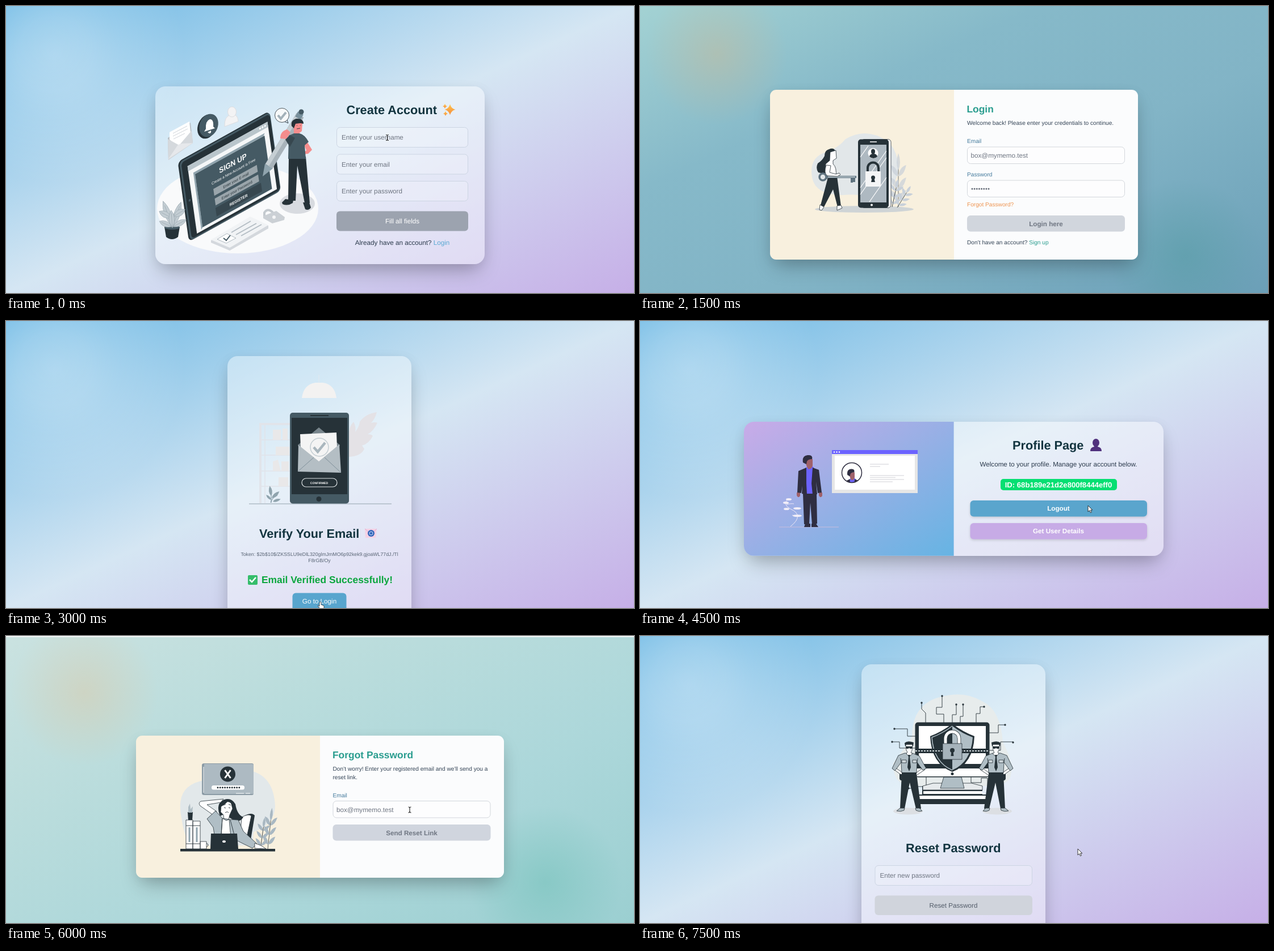
Write an HTML page that moves like this. It is 1106x507 px and loops after 9 s.

```html
<!DOCTYPE html>
<html lang="en">
<head>
<meta charset="utf-8">
<title>Account screens</title>
<style>
html, body { margin: 0; width: 100%; height: 100%; overflow: hidden }
section { position: absolute; left: 0; top: 0; width: 1106px; height: 507px; overflow: hidden; visibility: hidden }
section > svg { position: absolute; left: 0; top: 0; width: 1106px; height: 507px }
.sky { background: radial-gradient(circle at 85px 85px, #ffffff58, #ffffff46 65px, #ffffff2c 115px, #fff0 230px), linear-gradient(to bottom right, #6cb8e4, #d5e6f3 50%, #c6afe7) }
.teal { background: radial-gradient(circle at 135px 85px, #d4b58a60, #d4b58a00 125px), radial-gradient(circle at 960px 440px, #4f9a9f70, #4f9a9f00 135px), linear-gradient(to bottom right, #a3d2d3, #86b9c9 32%, #82b4c6 60%, #6b9fb7) }
.mint { background: linear-gradient(#f4f8f8 1.5px, #fff0 2px), radial-gradient(circle at 138px 100px, #dfc49c66, #dfc49c00 130px), radial-gradient(circle at 950px 435px, #68bdb370, #68bdb300 135px), linear-gradient(to bottom right, #cae2e0, #b9dcdc 35%, #acd7da 65%, #9bcfd1) }
.card { position: absolute; border-radius: 18px; background: #ffffff66; overflow: hidden; box-shadow: 0 18px 36px -9px #00000048, 0 4px 22px #0000000d }
.split { border-radius: 11px; background: linear-gradient(90deg, #f8f0de 50%, #fbfcfd 50%) }
text { font-family: "Liberation Sans", Arial, sans-serif; font-size: 11.67px; fill: #6f7682; white-space: pre; text-rendering: geometricPrecision }
.h { font-size: 21.7px; font-weight: bold; fill: #12343f }
.h2 { font-size: 17.4px; font-weight: bold; fill: #2a9d8f }
.s { font-size: 10.15px; fill: #344456 }
.tiny { font-size: 6.6px }
.token { font-size: 8.75px; fill: #586474 }
.lab { fill: #457b9d }
.c { text-anchor: middle }
.b { font-weight: bold }
.ink { fill: #2b3a4c }
.d { fill: #263238 } .m { fill: #455a64 } .g { fill: #b0bec5 } .w { fill: #fff } .p { fill: #e6eaec }
.skin { fill: #f58d8d }
.l { fill: none; stroke: #263238; stroke-width: .9 }
.o { stroke: #263238; stroke-width: .8 }
.field { fill: #ffffff2e; stroke: #ccd5e3 }
.plain { fill: #fdfdfe; stroke: #d3d7dc }
</style>
</head>
<body>
<svg width="0" height="0" style="position:absolute">
  <defs>
    <linearGradient id="spark" x2="0" y2="1"><stop stop-color="#ffc64d"/><stop offset="1" stop-color="#f58a3c"/></linearGradient>
    <path id="arrow" d="M0 0v11l2.6-2.4 1.9 4 1.9-.9-1.9-3.8h3.4z" fill="#fff" stroke="#222" stroke-width=".9"/>
    <path id="beam" d="M-2.5-5q2.5 0 2.5 2v6q0 2-2.5 2M2.5-5q-2.5 0-2.5 2v6q0 2 2.5 2" fill="none" stroke="#333" stroke-width="1.2"/>
    <path id="star" d="M0-1Q.2-.2 1 0Q.2.2 0 1Q-.2.2-1 0Q-.2-.2 0-1" fill="url(#spark)"/>
    <path id="leaf" d="M0 0Q-6-8 0-18Q6-8 0 0"/>
    <path id="wide" d="M0 0Q-11-13 0-24Q11-13 0 0M0 0V-20"/>
    <g id="sprig">
      <path d="M0 0V-44" class="l"/>
      <use href="#leaf" y="-38"/>
      <g id="pair"><use href="#leaf" transform="translate(0 -6) rotate(50)"/><use href="#leaf" transform="translate(0 -6) rotate(-50)"/></g>
      <use href="#pair" y="-13"/><use href="#pair" y="-26"/>
    </g>
    <g id="guard">
      <ellipse cx="472" cy="309.500" rx="26" ry="6" fill="#dcdfe3"/>
      <path class="d" d="M461 243h26l8 62h-9l-11-46-9 46h-8z"/>
      <path class="g o" d="M466 304l-1 4q-6 3-13 1l6-5zM485 304l1 4q5 3 11 1l-5-5z"/>
      <path class="w o" d="M446 235l4-2 12 8-1 5zM502 236l-4-3-12 9 1 4z"/>
      <path class="g o" d="M466 207l-11 4-11 23 5 4 11-15 1 19h26l1-19 10 14 6-3-12-22-12-5z"/>
      <path class="l" d="M460 224l-1-8M488 224l1-8"/>
      <path fill="#cfd8dc" class="o" d="M461 219h8v5h-8zM480 219h7v5h-7z"/>
      <path class="w o" d="M468 191h12l-1 11-2 4 3 2-6 5-5-5 2-3-2-3z"/>
      <path class="d" d="M472 210h4l-1 4 2 18-3 7-3-7 2-18zM461 241h26v3h-26zM457 244h6v11q-5 1-6-3zM467 195l-1-6q5-5 16-1l-1 7-2-3h-10zM468 195h12l-1 4h-4l-1-2-1 2h-4z"/>
    </g>
  </defs>
</svg>

<section class="sky">
  <div class="card" style="left:263px;top:141.500px;width:580px;height:314px"></div>
  <svg>
    <ellipse cx="408" cy="358" rx="142" ry="79" fill="#f9fafb"/>
    <ellipse cx="513" cy="349" rx="31" ry="18" fill="#d8dbe0"/>
    <!-- tablet -->
    <g transform="matrix(.88 -.49 .14 1 333 297)" class="c b">
      <rect x="-29" y="-36" width="183" height="141" rx="8" class="d"/>
      <rect x="-26" y="-34" width="181" height="139" rx="7" class="m"/>
      <rect x="-23" y="-31" width="177" height="134" rx="6" class="d"/>
      <rect x="-12" y="-20" width="160" height="119" fill="#f5f7f8"/>
      <rect x="-12" y="-20" width="160" height="9" fill="#b9c5cb"/>
      <path stroke="#fff" stroke-width="3" stroke-dasharray="3 2" d="M131-15.500h14"/>
      <path fill="#90a4ae" d="M-3-4h143l-3 4H0v94l-3 3z"/>
      <rect width="139" height="94" class="m"/>
      <text x="73" y="21" class="w" style="font-size:13.300px">SIGN UP</text>
      <text x="72" y="33" class="w tiny" font-weight="400">Create a New Account is Free</text>
      <path fill="#9aa5ab" d="M30 41h87v12h-87zM30 58h87v12h-87z"/>
      <text x="74" y="49.500" class="d tiny" font-weight="400">Enter your E-mail</text>
      <text x="73.500" y="66.500" class="d tiny" font-weight="400">Enter your Password</text>
      <path fill="#37474f" d="M29 74h91v15h-91z"/>
      <text x="74" y="84.500" class="w" style="font-size:7px">REGISTER</text>
      <circle cx="-17" cy="38" r="2" class="m"/>
    </g>
    <!-- floating icons -->
    <path fill="#b9c0c6" d="M285 233l40-27 4 36-43 30z"/>
    <path class="w" d="M288 223l35-19 3 29-22 17-16-14z"/>
    <path stroke="#cfd4d9" d="M294 225l25-13M294 230l26-13M295 235l20-10"/>
    <path fill="#d5d9dd" d="M285 235l20 11 22-26 2 22-43 30z"/>
    <path fill="#e6e8eb" d="M286 270l17-25 7-2 19-1z"/>
    <ellipse cx="354" cy="213" rx="16" ry="22" class="d" transform="rotate(22 354 213)"/>
    <ellipse cx="357" cy="211" rx="16" ry="21" class="m" transform="rotate(22 357 211)"/>
    <path class="w" d="M349 222l3-5q-1-14 7-17 7 0 6 13l3 3zM355 223l6-3q1 5-3 5z"/>
    <g fill="#f3f3f4" stroke="#dcdde0"><path d="M385 213q-1-18 11-21 12-3 13 12z"/><ellipse cx="398" cy="187" rx="7.500" ry="9"/></g>
    <path class="l w" d="M490 204l7 3-2-6"/>
    <circle cx="486" cy="193" r="12.500" fill="#f7f9fa" class="o"/>
    <path d="M479 193l5 6 9-11" fill="none" stroke="#a3b1b9" stroke-width="4"/>
    <!-- pen and writer -->
    <path d="M463 283l55-90" stroke="#a8b3ba" stroke-width="15"/>
    <path d="M460 281l55-90" stroke="#c5ced3" stroke-width="7"/>
    <path fill="#90a4ae" d="M456 279l14 8-18 14z"/>
    <path d="M514 198l5-9" stroke="#78909c" stroke-width="11"/><circle cx="520" cy="187" r="4.500" class="m"/>
    <path class="skin" d="M483 234q0-13 12-16l6 5-7 12zM506 207h16l-1 14-5 4v5h-9v-8zM531 241l8 13-7 7-11 1 8-7-4-10z"/>
    <path class="d" d="M503 212q-2-11 9-13 12 0 12 9l-6-1-8 1-3 8zM498 266h30l7 82h-9l-13-66-3 62h-13z"/>
    <path class="m" d="M498 229l9-4h10q9 2 16 15l-7 6 2 24h-31z"/>
    <path fill="#37474f" d="M492 236l8-8 9 5-9 16z"/>
    <path class="d" d="M492 341l14 2-1 5q-9 6-18 2l-1-3zM523 347h11l3 9q-4 6-10 3z"/>
    <path class="l" d="M512 211h1M518 211h1M512 217l6-1"/>
    <!-- plant, form and padlock -->
    <path class="d" d="M279 390h27l-3 18q-11 8-21 0z"/><ellipse cx="292.500" cy="391" rx="13.500" ry="4" class="m"/>
    <g fill="#c3cdd3" stroke="#8d9ca5" stroke-width=".5">
      <use href="#wide" transform="translate(293 390) rotate(-20) scale(1 2)"/><use href="#wide" transform="translate(294 390) rotate(18) scale(1 1.900)"/>
      <use href="#wide" transform="translate(291 374) rotate(-62)"/><use href="#wide" transform="translate(295 372) rotate(58)"/>
      <use href="#wide" transform="translate(292 390) rotate(-66) scale(.9 1)"/><use href="#wide" transform="translate(294 390) rotate(62) scale(.9 1.100)"/>
      <use href="#wide" transform="translate(293 392) rotate(-4) scale(.9 1.300)"/>
    </g>
    <path fill="#d4d8dd" d="M361 414l69-41 32 15v5l-68 39-33-14z"/><path fill="#f1f3f5" d="M361 413l69-41 32 15-68 40z"/>
    <path class="w" stroke="#b0b9c0" d="M372 412l17-10 16 8-17 9z"/>
    <path d="M383 410l5 4 7-9" fill="none" stroke="#455a64" stroke-width="2"/>
    <path stroke="#b4bdc4" stroke-width="2" d="M397 400l34-20M405 404l36-20M414 406l36-20"/>
    <path d="M455 372v-7q6-9 15 0v9" fill="none" stroke="#c4cacf" stroke-width="4"/><path fill="#cbd0d5" d="M453 371l23-9 15 11-1 5-21 6-16-9z"/><circle cx="472" cy="373" r="3" fill="#f4f5f6"/>
    <!-- form -->
    <text class="h" x="599.500" y="191">Create Account</text>
    <use href="#star" transform="translate(782 183) scale(9.500)"/><use href="#star" transform="translate(773 177) scale(4)"/><use href="#star" transform="translate(774 190) scale(4)"/>
    <g class="field"><rect id="f" x="582.500" y="214.500" width="231" height="35" rx="6"/><use href="#f" y="47.500"/><use href="#f" y="95"/></g>
    <text x="591" y="236">Enter your username</text><text x="591" y="283.500">Enter your email</text><text x="591" y="331">Enter your password</text>
    <rect x="582" y="362.500" width="232" height="35" rx="6" fill="#9ca3af"/>
    <text class="c w" x="698" y="384">Fill all fields</text>
    <text class="c ink" x="698" y="422">Already have an account? <tspan fill="#5aa9d3">Login</tspan></text>
    <use href="#beam" x="671.500" y="232.500"/>
  </svg>
</section>

<section class="teal">
  <div class="card split" style="left:229px;top:147.500px;width:648px;height:300.500px"></div>
  <svg>
    <path fill="#e2e7e9" d="M303 303q-6-36 25-45 21-7 34-23 37-22 74 4 20 18 19 54-12 46-53 43-21-4-45-2-48 0-54-31z"/>
    <ellipse cx="395" cy="359" rx="87" ry="6" fill="#cfd4d6"/>
    <g fill="#c8d0d9"><use href="#sprig" transform="translate(455 355) scale(1 1.700)" opacity=".7"/><use href="#sprig" transform="translate(444 355) rotate(12) scale(.9)"/><use href="#sprig" transform="translate(453 356) rotate(32) scale(.8)"/></g>
    <rect x="390" y="235.500" width="52" height="121" rx="5" class="w o"/>
    <rect x="384" y="235.500" width="54" height="121" rx="5" class="d"/>
    <path fill="#aeb9c1" d="M388 245h46v102h-46z"/>
    <path stroke="#fff" d="M388 321l46-65M388 333l46-65M404 346l30-43M388 267l14-20" stroke-width="1.200"/>
    <path stroke="#fff" d="M405 240h12M440 245v18" stroke-width="1.500"/>
    <circle cx="408" cy="351.500" r="2" class="w"/>
    <circle cx="410.500" cy="260" r="9" class="w"/><path class="d" d="M404 266q1-5 7-5t7 5q-7 6-14 0z"/><ellipse cx="410.500" cy="257" rx="3.500" ry="4.500" class="d"/>
    <path d="M401 294v-8a9.500 9.500 0 0 1 19 0v8" fill="none" stroke="#263238" stroke-width="4"/>
    <rect x="397" y="292" width="27" height="27" fill="#f4f5f6"/><circle cx="410.500" cy="303" r="3.500" class="d"/><path class="d" d="M409 303h3l2 8h-7z"/>
    <path class="d" d="M345 258q-3-9-12-5-8 2-8 12-4 8-12 13-4 9 1 16 14 4 20-2 6-7 4-18z"/>
    <path class="w o" d="M335 258l10-3 1 14-6 4v6q7 6 5 23l-15 4-4-9 1-18 7-6z"/>
    <path class="d" d="M331 303l16-2 7 53-6 1-8-31-16 31-6-3z"/>
    <path class="w o" d="M317 351l7 4-4 6-4-1zM347 353l7-1 2 5-9 4z"/>
    <g fill="none" stroke="#607480"><circle cx="322" cy="302" r="6" stroke-width="3.500"/><path d="M329 302h52M373 303v9M377 303v8" stroke-width="4"/></g>
    <path d="M331 302h48" stroke="#b0bec5" stroke-width="2"/>
    <path class="w o" d="M328 281q-5 14 2 19l18 1 5-3-2-3-6 2-11-3 2-12z"/>
    <text class="h2" x="575.500" y="188">Login</text>
    <text class="s" x="576" y="210">Welcome back! Please enter your credentials to continue.</text>
    <text class="s lab" x="576" y="242">Email</text><text class="s lab" x="576" y="301">Password</text>
    <g class="plain"><rect x="576.500" y="249" width="277" height="29.500" rx="6"/><rect x="576.500" y="308" width="277" height="29.500" rx="6"/></g>
    <text x="582.500" y="268">box@mymemo.test</text>
    <path d="M585 323h31" stroke="#666d78" stroke-width="3" stroke-linecap="round" stroke-dasharray="0 4.150"/>
    <text class="s" x="576" y="354" style="fill:#ee9450">Forgot Password?</text>
    <rect x="576" y="370" width="278" height="28.500" rx="6" fill="#d1d6dd"/>
    <text class="c b" x="715" y="388.500">Login here</text>
    <text class="s" x="576" y="420.500">Don’t have an account? <tspan fill="#2a9d8f">Sign up</tspan></text>
  </svg>
</section>

<section class="sky">
  <div class="card" style="left:390px;top:62px;width:324px;height:500px"></div>
  <svg>
    <path fill="#f3f2f1" d="M521 136q3-24 24-27h13q21 3 24 27z"/>
    <path stroke="#e3e8ee" d="M551 95v14"/>
    <g fill="none" stroke="#e1e4ea"><path stroke-width="4" d="M448 322v-140h52"/><path stroke-width="1.500" d="M456 322v-140M450 210h50M450 237h50M450 265h50M450 292h50"/></g>
    <path fill="#e9e8e9" d="M470 192h14v18h-14zM487 190h9v20h-9zM475 222h24v15h-24zM470 248l9-3 5 20h-14zM485 248h13v17h-13zM480 276h17v16h-17z"/>
    <path fill="#e4e2e6" d="M604 240v-38q-1-14 8-24 5 9 3 18 7-9 8-18 10-14 30-17-3 12-10 19 7-2 11 0-8 16-17 20 7 0 9 3-7 14-19 17l4 6q-6 13-27 14z"/>
    <path d="M428 323h251" stroke="#93a3ad"/>
    <g fill="#90a4ae"><path d="M467 321q0-15 0-20M466 321q4-11 12-13" stroke="#78909c" fill="none"/><use href="#leaf" transform="translate(467 309) rotate(-8)"/><use href="#leaf" transform="translate(468 313) rotate(48)"/><use href="#leaf" transform="translate(467 316) rotate(-45) scale(.7)"/><use href="#leaf" transform="translate(470 319) rotate(72) scale(.8)"/></g>
    <rect x="500" y="162" width="104" height="160.500" rx="5" class="m"/>
    <path class="d" d="M503 171h98v135h-98zM536 166h32v2h-32z"/><circle cx="551" cy="314.500" r="4.500" class="d"/>
    <path fill="#78858c" d="M514 219l37-31 37 31-1 3h-72z"/><path fill="#f4f4f4" d="M518 200l64-3 2 52h-64z"/>
    <path fill="#b4bec4" d="M515 219l36 29 36-30 3 50-76-2z"/>
    <path d="M515 265l27-24M589 267l-28-26" stroke="#7e8f99"/>
    <circle cx="552" cy="223" r="16" fill="none" stroke="#c3cdd2" stroke-width="1.500"/><path d="M542 223l7 8 13-16" fill="none" stroke="#aab7be" stroke-width="4.500"/>
    <rect x="521" y="278" width="62" height="15" rx="7.500" fill="none" stroke="#dfe4e6" stroke-width="1.200"/>
    <text class="c b w" x="551.500" y="287.500" style="font-size:5.200px">CONFIRMED</text>
    <text class="h" x="446" y="382.500">Verify Your Email</text>
    <path fill="#f4d1e4" d="M632 367h21l-2 16h-18z"/><path d="M632 367l11 10 10-10" fill="none" stroke="#dca9d2"/><circle cx="643" cy="375" r="6" fill="#3467ba"/><circle cx="643" cy="375" r="3" fill="none" stroke="#cfe1ff"/>
    <text class="c token" x="552" y="415">Token: $2b$10$/ZKSSLU9eDlL320glmJmMO6p92kek9.gjoaWL77dJ./Tl</text><text class="c token" x="552" y="426">F8rGB/Oy</text>
    <rect x="426" y="449" width="17" height="17" rx="2" fill="#35bd6b"/><path d="M429 457l4 4 7-8" fill="none" stroke="#fff" stroke-width="2.500"/>
    <text class="h2" x="450" y="463" style="fill:#0ba63e">Email Verified Successfully!</text>
    <rect x="504.500" y="480.500" width="95" height="34" rx="6" fill="#58a5ce"/>
    <text class="c w" x="552" y="499">Go to Login</text>
    <path class="w o" d="M552 504v-7q2-2 3 0v4l5 2v5h-7l-4-5q1-2 3 1z"/>
  </svg>
</section>

<section class="sky">
  <div class="card" style="left:183px;top:178px;width:739px;height:236.500px;background:linear-gradient(to bottom right,#c9abe8,#66b4e3) 0/369.500px 100% no-repeat,linear-gradient(90deg,#fff0 369.500px,#ffffff70 0)"></div>
  <svg>
    <path d="M245 364h105" stroke="#c8bddd"/>
    <path d="M265 363q25-20 0-31-15-8-4-18M258 324q9-2 13-1M268 343q11 3 15 1" fill="none" stroke="#eee8f6"/>
    <g fill="#f2eef8"><ellipse cx="262" cy="315" rx="5" ry="2"/><ellipse cx="257" cy="321" rx="5" ry="2"/><ellipse cx="277" cy="331" rx="7" ry="2"/><ellipse cx="258" cy="332" rx="5" ry="2"/><ellipse cx="277" cy="344" rx="8" ry="2"/></g>
    <path fill="#a0616a" d="M276 303h6v6q-4 5-6-1zM315 303h6v6q-4 5-6-1z"/>
    <g id="bust"><path fill="#6c63ff" d="M291 260l5-3h8l3 3v45h-15z"/><path fill="#a0616a" d="M290 244h14v12l-2 4-5 2-3-4z"/><path fill="#2f2e41" d="M287 250q-2-12 8-13 10-1 8 7-7 0-9 4l-1 5zM293 259l-14 6-2 38 7 1 2-13-1 14 9 2-1-20zM304 259l11 4 5 40-7 1-3-20 2 22-8 1-2-20z"/></g>
    <path fill="#2f2e41" d="M287 305h24l1 53-9 1-3-38-2 38h-9zM291 358h9v6h-11zM302 358h8l4 6h-12z"/>
    <path fill="#e6e6e6" d="M338 228h151v76h-151z"/><path class="w" d="M343 238h141v60h-141z"/><path fill="#6c63ff" d="M338 228h151v7h-151z"/>
    <path d="M342 231.500h11" stroke="#fff" stroke-width="2.500" stroke-linecap="round" stroke-dasharray="0 4.500"/>
    <path d="M405 253h33M405 257h18M405 273h60M405 276.500h45M405 280h60M405 284h40" stroke="#e0e0e3" stroke-width="1.500"/>
    <clipPath id="round"><circle cx="373" cy="268" r="17"/></clipPath>
    <g clip-path="url(#round)"><use href="#bust" transform="translate(150 72) scale(.75 .8)"/></g><circle cx="373" cy="268" r="17.500" fill="none" stroke="#2f2e41" stroke-width="1.500"/>
    <text class="h" x="656" y="227">Profile Page</text>
    <path fill="#50317d" d="M793 230q0-7 7-8-4-13 3-13 7 0 3 13 7 1 7 8z"/><ellipse cx="803" cy="215" rx="6" ry="7" fill="#50317d"/>
    <text class="c ink" x="737" y="257">Welcome to your profile. Manage your account below.</text>
    <rect x="635" y="279" width="205" height="20" rx="5" fill="#06df72"/>
    <text class="c b w" x="737" y="293.500" style="font-size:13.100px">ID: 68b189e21d2e800f8444eff0</text>
    <g style="filter:drop-shadow(0 2px 2px #0002)"><rect x="581.500" y="317" width="311.500" height="28.500" rx="6" fill="#5aa5cd"/><rect x="581.500" y="357" width="311.500" height="28.500" rx="6" fill="#c7abe6"/></g>
    <text class="c b w" x="737" y="335">Logout</text><text class="c b w" x="737" y="375">Get User Details</text>
    <use href="#arrow" x="789" y="326"/>
  </svg>
</section>

<section class="mint">
  <div class="card split" style="left:228.500px;top:176px;width:648px;height:251px"></div>
  <svg>
    <path fill="#e2e8ea" d="M309 321q-11-52 31-64 15-3 24-12 33-23 76-4 32 13 34 60-2 34-38 45l-2 24h-110q-12-23-15-49z"/>
    <path fill="#8b9ba5" d="M345 228q0-3 4-3h84q3 0 3 3v50q0 3-3 3h-84q-4 0-4-3z"/><path fill="#adbac2" d="M349 226h84q3 0 3 3v50h-87z"/>
    <path d="M348 277v-46M405 278h14M422 278h8" stroke="#fff"/>
    <circle cx="390.500" cy="244" r="13.500" class="d"/><path d="M385.500 237l10 14M395.500 237l-10 14" stroke="#fff" stroke-width="3"/>
    <rect x="362" y="264" width="58" height="7.500" rx="3.500" class="w"/><path d="M373 267.800h38" stroke="#263238" stroke-width="3" stroke-linecap="round" stroke-dasharray="0 4.200"/>
    <g fill="#a9b8c2"><use href="#sprig" transform="translate(448 376) rotate(8) scale(.8 1)"/><use href="#sprig" transform="translate(461 376) rotate(6) scale(.8 1.300)"/></g>
    <path class="d" d="M421 317q12-6 17 0l-7 43h-20z"/><path class="w o" d="M415 320q13-7 17-2l-9 42h-11z"/>
    <path class="d" d="M377 318q-7-18 2-26 16-10 25 5 3 19 14 23-6 10-15 5-11-2-15-12z"/>
    <path class="w o" d="M379 299q5-9 17-6l3 12-5 11-2 8-8 1-1-9-5-5z"/>
    <path class="d" d="M377 302q0-16 17-13 11 3 8 17-4-13-12-13-7 7-13 9z"/>
    <path class="l" d="M384 303l3 1M392 303l3 1M386 312q4-3 6 0M383 299l4-2M392 297l4 2"/>
    <path class="w o" d="M383 288l-20 2-20 2q-5 3-1 8l24 17 5-7-17-12 24-4z"/>
    <path class="g o" d="M369 309l12 13 12 2 16 1 9 20 24 22-8 8-28-14v14h-35l-6-37-11-15z"/>
    <path class="w o" d="M381 322l7 4 5-2 4 45h-19zM438 366l11 4 9 6-20-1z"/>
    <path class="l" d="M381 323l-2 28M395 325l8 30"/>
    <path class="d" d="M361 349h46l2 27h-49zM320 311h9l-1 15h-7z"/><path class="g" d="M321 312v-10l3-6 1 10 4-5-1 11z"/><ellipse cx="384" cy="363" rx="3" ry="2" class="w"/>
    <path class="w o" d="M317 325h12v51h-12zM329 327h13v49h-13zM342 363h11v13h-11z"/><path class="l" d="M317 335h25M317 367h25M353 366q6 3 0 7"/><path stroke="#90a4ae" stroke-width="3" d="M323 338v26M336 338v26"/>
    <path class="d" d="M307 376h167v4.500h-167z"/>
    <text class="h2" x="575" y="216">Forgot Password</text>
    <text class="s" x="575.500" y="238">Don’t worry! Enter your registered email and we’ll send you a</text><text class="s" x="575.500" y="252.500">reset link.</text>
    <text class="s lab" x="575.500" y="284.500">Email</text>
    <rect class="plain" x="576" y="291.500" width="277" height="29.500" rx="6"/>
    <text x="582" y="310.500">box@mymemo.test</text>
    <rect x="575.500" y="333" width="278" height="28.500" rx="6" fill="#d0d5de"/>
    <text class="c b" x="714.500" y="351.500">Send Reset Link</text>
    <use href="#beam" x="711" y="307"/>
  </svg>
</section>

<section class="sky">
  <div class="card" style="left:390px;top:50px;width:324px;height:500px"></div>
  <svg>
    <path fill="#e7ecec" d="M479 178q0-53 42-68 48-16 83 6 31 15 35 71 22 42 12 65-12 16-45 13h-128q-33-2-32-40 17-23 33-47z"/>
    <path class="l" d="M503 153v-17l-7-7v-11M535 153v-15h-13v-12h10v-20M550 153v-14h7v-18M569 121v21h-5v11M592 153v-16h7v-12h7M615 171h16v-14h12M485 177h-14v-13h-23M485 198h-28v-11h-13M615 202h20v-15h22M504 249v17h-17v3h-14M583 249v10h18v-8h11v15"/>
    <path stroke="#263238" stroke-width="3.400" stroke-linecap="round" d="M496 118h0M532 106h0M557 121h0M569 121h0M606 125h0M643 157h0M448 164h0M444 187h0M657 188h0M473 269h0"/>
    <path class="d" d="M497 265h106v15h-106zM490 280h122v17h-122z"/><path class="w" d="M499 274h104v5h-104zM491 282h120v6h-120z"/><path class="p o" d="M498 265l18-5h68l19 5v7h-105z"/>
    <path class="g o" d="M535 249h31l5 20h-42z"/>
    <rect x="484.500" y="152.500" width="131" height="97" rx="5" class="d"/><path class="w" d="M491 159h118v67h-118zM485.500 234h129v11q0 3-4 3h-121q-4 0-4-3z"/>
    <circle cx="550" cy="243.500" r="2.500" class="d"/>
    <path class="d" d="M550 155q18 14 39 22-2 49-39 63-37-14-39-63 21-8 39-22z"/><path class="g" d="M550 159q17 13 36 20-3 44-36 58z"/><path d="M550 159q-17 13-36 20 3 44 36 58" fill="none" stroke="#b0bec5" stroke-width="1.500"/>
    <path d="M485 203h130" stroke="#263238" stroke-width="8"/><path d="M485 203h130" stroke="#cfd8dc" stroke-width="2" stroke-dasharray="3 2"/>
    <path d="M538 191v-10a12 12 0 0 1 24 0v10" fill="none" stroke="#263238" stroke-width="6.500"/><path d="M538 191v-10a12 12 0 0 1 24 0v10" fill="none" stroke="#fff" stroke-width="5"/>
    <path fill="#a6b3bb" class="o" d="M533 190h34v28h-34z"/><circle cx="550" cy="202" r="4" class="d"/><path class="d" d="M548.500 203h3l1 9h-5z"/>
    <use href="#guard"/><use href="#guard" transform="translate(1101) scale(-1 1)"/>
    <text class="h" x="468" y="382">Reset Password</text>
    <rect class="field" x="414" y="405.500" width="276.500" height="35" rx="6"/><text x="422.500" y="427">Enter new password</text>
    <rect x="413.500" y="458.500" width="277.500" height="34.500" rx="6" fill="#d0d4dc"/><text class="c" x="552" y="480" style="fill:#535c69">Reset Password</text>
    <use href="#arrow" x="771" y="376"/>
  </svg>
</section>

<script>
const HOLD = 1500;
const screens = [...document.querySelectorAll('section')];
function show() {
  const current = Math.floor(performance.now() / HOLD) % screens.length;
  screens.forEach((screen, i) => screen.style.visibility = i === current ? 'visible' : 'hidden');
  requestAnimationFrame(show);
}
show();
</script>
</body>
</html>
```
